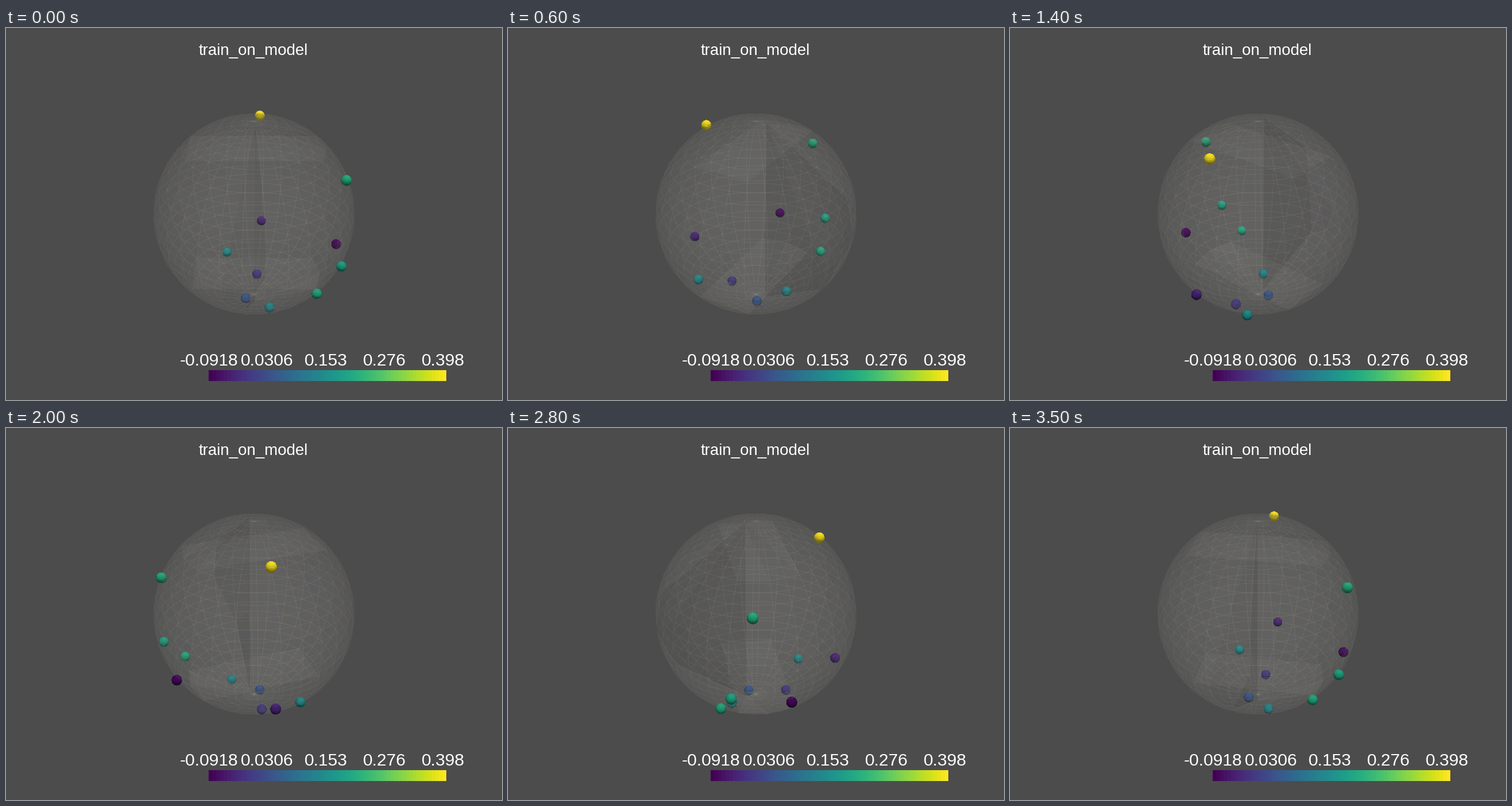
Write a matplotlib script that moves like this. It is 864 by 648 pixels and loops after 3600 ms.

```python
import numpy as np
import matplotlib.pyplot as plt
from matplotlib.animation import FuncAnimation
from matplotlib.collections import PolyCollection

W, H, DPI = 864, 648, 100
FRAMES = 36
FOCAL = H / 2 / np.tan(np.radians(15))
DIST, RADIUS, ORBIT, BALL = 1000, 143.3, 145, 7.0
TILT = np.radians(30)
STEP = 180 / 29  # polar spacing of the shell rings

# azimuth, elevation (degrees), colormap position
POINTS = [
    (174.4, 53.3, 1.0), (78.2, 27.9, 0.63), (66.0, -21.7, 0.59),
    (54.0, -40.3, 0.61), (174.2, -34.3, 0.10), (174.4, -71.4, 0.17),
    (102.0, -28.1, 0.02), (210.0, -52.7, 0.49), (29.3, -71.2, 0.47),
    (305.0, -83.7, 0.27),
]


def polar(az, pol, r=1.0):
    """World position from azimuth and polar angle in degrees."""
    az, pol = np.radians(az), np.radians(pol)
    return r * np.stack([np.sin(pol) * np.sin(az),
                         np.sin(pol) * np.cos(az),
                         np.cos(pol) + 0 * az], axis=-1)


def sphere_quads(n_az, n_pol, offset=0.0):
    az, pol = np.meshgrid(offset + np.arange(n_az + 1) * 360 / n_az,
                          np.linspace(0, 180, n_pol + 1))
    p = polar(az, pol)
    quads = np.stack([p[:-1, :-1], p[1:, :-1], p[1:, 1:], p[:-1, 1:]], axis=2)
    return quads.reshape(-1, 4, 3)


def to_view(p, turn):
    """Orbit the scene, then tilt; the last axis points at the camera."""
    x, w, h = p[..., 0], p[..., 1], p[..., 2]
    c, s = np.cos(turn), np.sin(turn)
    x, w = x * c + w * s, w * c - x * s
    c, s = np.cos(TILT), np.sin(TILT)
    return np.stack([x, h * c - w * s, w * c + h * s], axis=-1)


def to_screen(v):
    k = FOCAL / (DIST - v[..., 2])
    return np.stack([W / 2 + v[..., 0] * k, H / 2 - v[..., 1] * k], axis=-1)


def unit(v):
    return v / np.linalg.norm(v, axis=-1, keepdims=True)


def facing(center, normal):
    return np.sum(unit(np.array([0, 0, DIST]) - center) * normal, axis=-1)


def rings(*corners):
    """Shell vertices given as (azimuth, ring number)."""
    return np.array([polar(az, n * STEP, RADIUS) for az, n in corners])


SHELL = sphere_quads(30, 29, 6) * RADIUS
UNIT_BALL = sphere_quads(16, 10)
CENTERS = np.array([polar(az, 90 - el, ORBIT) for az, el, _ in POINTS])
BALLS = (CENTERS[:, None, None] + BALL * UNIT_BALL).reshape(-1, 4, 3)
BALL_NORMALS = np.tile(unit(UNIT_BALL.mean(axis=1)), (len(POINTS), 1))
BALL_RGB = np.repeat(plt.get_cmap("viridis")([v for *_, v in POINTS])[:, :3],
                     len(UNIT_BALL), axis=0)

LIGHT, DARK = (0.63, 0.62, 0.59), (0.10, 0.10, 0.10)
TOP, BOTTOM = (6, 1), (6, 28)
INNER = [
    (rings((114, 7), (90, 7), (66, 7), (294, 7), (246, 7)), LIGHT, 0.09),
    (rings((114, 22), (90, 22), (66, 22), (294, 22), (246, 22)), LIGHT, 0.09),
    (rings(TOP, (90, 7), (114, 7)), DARK, 0.04),
    (rings(BOTTOM, (90, 22), (66, 22)), LIGHT, 0.06),
    (rings(TOP, (6, 11), (6, 14), (6, 15), (-6, 20), BOTTOM), DARK, 0.09),
    (rings(TOP, (-18, 17), (-18, 19), (-6, 20), BOTTOM), DARK, 0.04),
]

fig = plt.figure(figsize=(W / DPI, H / DPI), dpi=DPI, facecolor="#4c4c4c")
ax = fig.add_axes([0, 0, 1, 1])
ax.set_axis_off()


def layer(z):
    coll = PolyCollection([], edgecolors="none", linewidths=0,
                          antialiaseds=False, zorder=z)
    ax.add_collection(coll, autolim=False)
    return coll


balls_back, shell_back, inner, balls_mid, shell_front, balls_front = (
    layer(z) for z in range(1, 7))

bar = np.linspace(0, 1, 64)[None, :]
ax.imshow(bar, cmap="viridis", extent=(352.5, 766, 615, 596),
          aspect="auto", interpolation="nearest", zorder=8)
ax.set_xlim(0, W)
ax.set_ylim(H, 0)


def label(x, y, text, px):
    ax.text(x, y, text, color="white", family="Liberation Sans",
            fontsize=px * 72 / DPI, ha="center", va="baseline", zorder=9)


label(431, 47, "train_on_model", 27.6)
for i, text in enumerate(["-0.0918", "0.0306", "0.153", "0.276", "0.398"]):
    label(353 + 102 * i, 588, text, 30)


def fill(coll, view, colors):
    coll.set_verts(to_screen(view))
    coll.set_facecolor(colors)


def draw_shell(turn):
    view = to_view(SHELL, turn)
    center = view.mean(axis=1)
    look = facing(center, unit(center))
    shade = (105 + 92 * np.abs(look)) / 255
    rgba = np.stack([shade, shade * 0.99, shade * 0.955,
                     np.full_like(shade, 0.1)], axis=-1)
    for coll, mask in ((shell_front, look > 0), (shell_back, look <= 0)):
        fill(coll, view[mask], rgba[mask])


def draw_balls(turn):
    view = to_view(BALLS, turn)
    normal = to_view(BALL_NORMALS, turn)
    center = view.mean(axis=1)
    lit = np.clip(normal @ unit(np.array([0.1, 0.65, 0.75])), 0, 1)
    rgb = BALL_RGB * (0.42 + 0.55 * lit)[:, None]
    seen = facing(center, normal) > 0
    outside = np.linalg.norm(center, axis=-1) > RADIUS
    near = facing(center, unit(center)) > 0
    order = np.argsort(center[:, 2])
    groups = ((balls_back, outside & ~near), (balls_mid, ~outside),
              (balls_front, outside & near))
    for coll, mask in groups:
        pick = order[(mask & seen)[order]]
        fill(coll, view[pick], rgb[pick])


def update(i):
    turn = 2 * np.pi * i / FRAMES
    draw_shell(turn)
    inner.set_verts([to_screen(to_view(p, turn)) for p, _, _ in INNER])
    inner.set_facecolor([(*rgb, a) for _, rgb, a in INNER])
    draw_balls(turn)
    return []


anim = FuncAnimation(fig, update, frames=FRAMES, interval=100,
                     repeat=True, repeat_delay=0, blit=False)
plt.show()
```
